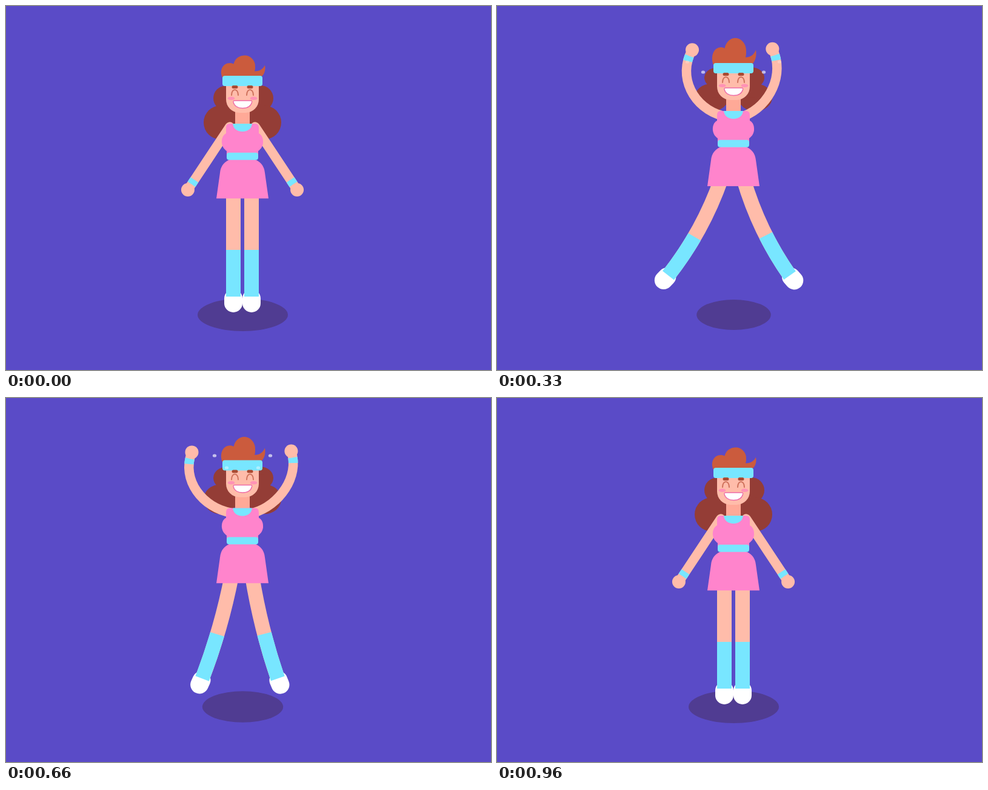
Write an HTML page that moves like this. It is 800 px wide and 600 px high and loops after 1230 ms.

```html
<!DOCTYPE html>
<html lang="en">
<head>
<meta charset="utf-8">
<title>Jumping jacks</title>
<style>
  html, body { margin: 0; width: 100%; height: 100%; overflow: hidden; background: #5a4bc7; }
  svg { display: block; width: 100%; height: 100%; }
  .skin { fill: #ffbcaa; }
  .cyan { fill: #78e6ff; }
  .pink { fill: #ff84cc; }
  .line { fill: none; stroke: #ffbcaa; }
  .band { fill: none; stroke: #78e6ff; }
  .leg { stroke-width: 24; }
  .arm { stroke-width: 15.5; stroke-linecap: round; }
  .sock { stroke-width: 24; stroke-dasharray: 77 999; }
  .wrist { stroke-width: 15.5; stroke-dasharray: 0 11 9 999; }
</style>
</head>
<body>
<svg viewBox="0 0 800 600">
  <ellipse id="shadow" cx="390.5" cy="509" fill="#503c92"/>

  <g id="backHair" fill="#943d36">
    <circle cx="362.5" cy="152" r="20.5"/>
    <circle cx="420" cy="152" r="21"/>
    <circle cx="354" cy="192" r="28"/>
    <circle cx="426" cy="192" r="28"/>
    <rect x="354" y="146" width="72" height="46"/>
  </g>

  <g id="legs"></g>

  <g id="body">
    <g id="arms"></g>
    <rect fill="#ffa997" x="378" y="165" width="24" height="36"/>
    <path class="pink" d="M369 194H411Q417 194 417 201V210C423 213 424.500 220 424 226C423 233 419 237 416 239V250H364V239C361 237 357 233 356 226C355.500 220 357 213 363 210V201Q363 194 369 194Z"/>
    <path class="cyan" d="M374 194H406C405 202 399 207 390 207S375 202 374 194Z"/>
  </g>

  <path id="skirt" class="pink" d="M372 252C360 256 354 264 353 275L347 317.300H433L427 275C426 264 420 256 408 252Z"/>

  <g id="head">
    <rect class="cyan" x="364" y="241.700" width="52" height="12" rx="4"/>
    <path class="skin" d="M363 122V154A22 22 0 0 0 385 176H395A22 22 0 0 0 417 154V122Z"/>
    <path id="frontHair" fill="#cb5b3d" d="M357 118C352 108 356 94 370 94Q373 94 375.500 95.500A18 18 0 0 1 411 101Q411.300 104 410 107.500C418 108 424 104 427 97.500C429 107 425 115 419 118Z"/>
    <rect class="cyan" x="357" y="115" width="66" height="17" rx="4"/>
    <g fill="#a94a32">
      <rect x="372.500" y="131" width="10" height="5" rx="2.500"/>
      <rect x="397.500" y="131" width="10" height="5" rx="2.500"/>
    </g>
    <g fill="none" stroke="#cf735d" stroke-width="2" stroke-linecap="round">
      <path d="M372 147C372 135 383 135 383 147"/>
      <path d="M397 147C397 135 408 135 408 147"/>
    </g>
    <g fill="#ff92b6">
      <ellipse cx="371.500" cy="152.300" rx="5.800" ry="2.800"/>
      <ellipse cx="408.500" cy="152.300" rx="5.800" ry="2.800"/>
    </g>
    <path fill="#fff" stroke="#ee6ca8" stroke-width="1.300" d="M377 156H404Q406 156 405.600 158.500C404 165 398 168.500 390.300 168.500S376.500 165 375 158.500Q374.600 156 377 156Z"/>
  </g>

  <g id="drops" fill="#fff"></g>
</svg>
<script>
const NS = 'http://www.w3.org/2000/svg';
const LOOP = 1230, STEP = 30, REPEAT = 450;
const $ = id => document.getElementById(id);

function add(parent, tag, attrs) {
  const el = document.createElementNS(NS, tag);
  set(el, attrs);
  return parent.appendChild(el);
}
function set(el, attrs) {
  for (const name in attrs) el.setAttribute(name, attrs[name]);
}

// Eased value at time t from [time, value] keys
function track(t, ...keys) {
  if (t <= keys[0][0]) return keys[0][1];
  for (let i = 1; i < keys.length; i++) {
    const [t0, a] = keys[i - 1], [t1, b] = keys[i];
    if (t < t1) {
      const u = (t - t0) / (t1 - t0);
      return a + (b - a) * u * u * (3 - 2 * u);
    }
  }
  return keys[keys.length - 1][1];
}

function makeLeg(x, hip, knee, foot) {
  const g = $('legs');
  return {
    x, hip, knee, foot,
    skin: add(g, 'path', { class: 'line leg' }),
    shoe: add(g, 'rect', { x: -15, y: -12, width: 30, height: 38, rx: 15, fill: '#fff' }),
    sock: add(g, 'path', { class: 'band sock' })
  };
}

function makeArm(side, swing, bend) {
  const g = $('arms');
  return {
    side, swing, bend,
    skin: add(g, 'path', { class: 'line arm' }),
    wrist: add(g, 'path', { class: 'band wrist' }),
    hand: add(g, 'circle', { class: 'skin', r: 11 })
  };
}

const legs = [makeLeg(375, -5, -35.5, -92.5), makeLeg(405, 1.5, 27, 78)];
const arms = [makeArm(-1, 121.7, 1), makeArm(1, 123.6, .85)];

const drops = [];
for (const side of [-1, 1]) {
  for (const [start, speed, lift, life, fade] of [[130, .25, -.34, 275, 300], [210, .2, -.185, 225, 170]]) {
    const el = add($('drops'), 'ellipse', { rx: 3.2, ry: 2.6 });
    drops.push({ side, start, speed, lift, life, fade, el });
  }
}

function poseLeg(leg, s) {
  const ax = leg.x + leg.foot * s, ay = 479 - 14.5 * s * s;
  const kx = leg.x + leg.knee * s, ky = 392;
  const d = `M${ax} ${ay}Q${kx} ${ky} ${leg.x + leg.hip * s} 305`;
  const turn = Math.atan2(kx - ax, ay - ky) * 180 / Math.PI + 6 * s * Math.sign(-leg.foot);
  set(leg.skin, { d });
  set(leg.sock, { d });
  set(leg.shoe, { transform: `translate(${ax} ${ay}) rotate(${turn})` });
}

function poseArm(arm, p) {
  const angle = (arm.swing * p - 56.4 + 8 * p * (1 - p)) * Math.PI / 180;
  const c = Math.cos(angle), s = Math.sin(angle);
  const x0 = 21 - 3 * p, y0 = 199 + 3 * p;
  // along the shoulder-to-hand line, and bowed out from it
  const at = (along, bow) => [
    390 + arm.side * (x0 + along * c + bow * arm.bend * s),
    y0 - along * s + bow * arm.bend * c
  ];
  const hand = at(124.8 - 14.5 * p + 9.3 * p * p, 0);
  const outer = at(97 - 7 * p * p, 41.5 * p * (1.6 - .6 * p));
  const inner = at(41 - 10 * p * p, 38 * p);
  const d = `M${hand}C${outer} ${inner} ${at(0, 0)}`;
  set(arm.skin, { d });
  set(arm.wrist, { d });
  set(arm.hand, { cx: hand[0], cy: hand[1] });
}

function poseDrop(drop, t) {
  const age = t - drop.start, z = Math.max(age, 0);
  const opacity = Math.min((age + 30) / 75, (drop.life - age) / drop.fade, .65);
  set(drop.el, {
    cx: 390 + drop.side * (26 + drop.speed * z),
    cy: 115 + drop.lift * z + .001125 * z * z,
    opacity: Math.max(opacity, 0)
  });
}

const scaleY = (pivot, k, dy) => `translate(0 ${pivot + dy}) scale(1 ${k}) translate(0 ${-pivot})`;

function draw(t) {
  const jump = t < 540 ? t : t - REPEAT;
  const lift = track(jump, [115, 0], [300, -24], [450, 5], [510, 0]);
  const hips = Math.min(lift, 0) * .97;
  const puff = track(jump, [115, 1], [300, 1.27], [450, .765], [510, 1]);
  const hang = track(jump, [115, 1], [300, .76], [450, 1.25], [510, 1]);
  const float = track(jump, [115, 0], [300, -10], [450, 0]);
  const spread = track(t, [60, 0], [240, 1], [330, 1], [420, 0], [550, 0], [755, 1], [780, 1], [870, 0]);
  const raise = track(t, [0, 0], [280, 1], [600, 1], [960, 0]);
  const move = { transform: `translate(0 ${lift})` };

  set($('shadow'), { rx: 74.5 + .65 * hips, ry: 27 + .1 * hips });
  set($('body'), move);
  set($('head'), move);
  set($('legs'), { transform: `translate(0 ${hips})` });
  set($('skirt'), { transform: scaleY(252, 1 - (lift - hips) / 65.3, lift) });
  set($('frontHair'), { transform: scaleY(117, puff, 0) });
  set($('backHair'), { transform: scaleY(132, hang, lift + float) });
  legs.forEach(leg => poseLeg(leg, spread));
  arms.forEach(arm => poseArm(arm, raise));
  drops.forEach(drop => poseDrop(drop, jump));
}

const begin = performance.now();
function tick() {
  const t = (performance.now() - begin) % LOOP;
  draw(Math.floor(t / STEP) * STEP);
  requestAnimationFrame(tick);
}
tick();
</script>
</body>
</html>
```
